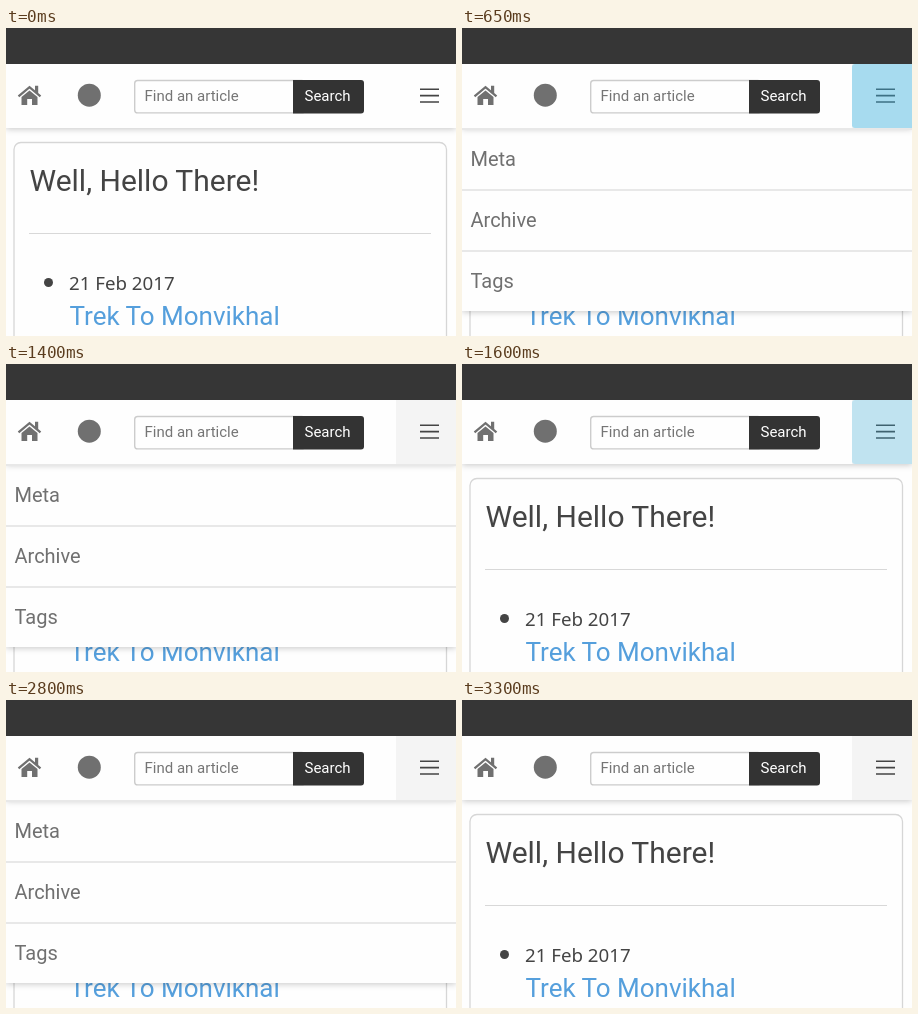
Write an HTML page that moves like this. It is 450 px wide and 308 px high and loops after 3350 ms.

```html
<!DOCTYPE html>
<html lang="en">
<head>
<meta charset="utf-8">
<title>Menu toggle</title>
<style>
html, body { margin: 0; width: 100%; height: 100%; overflow: hidden; background: #fefefe; }
svg { display: block; width: 450px; height: 308px; font-family: Roboto, sans-serif; }
.nav { filter: drop-shadow(0 1px 3px rgba(0, 0, 0, .22)); }
.icon, .item { fill: #707070; }
.item { font-size: 20px; }
.small { font-size: 15px; }
</style>
</head>
<body>
<svg viewBox="0 0 450 308">
  <rect width="450" height="308" fill="#fefefe"/>

  <g id="page" fill="#444">
    <rect x="8" y="114.5" width="432.5" height="220" rx="7" fill="#fefefe" stroke="#d6d6d6" stroke-width="1.3"/>
    <text x="23.5" y="163" font-size="30">Well, Hello There!</text>
    <path d="M23 205.5H425" stroke="#d8d8d8"/>
    <circle cx="42.5" cy="254.5" r="4.5"/>
    <text x="63" y="262" font-size="18.7" font-family="'Noto Sans', sans-serif">21 Feb 2017</text>
    <text x="63.5" y="297" font-size="26" fill="#559fdc">Trek To Monvikhal</text>
  </g>

  <g id="menu" class="nav">
    <rect y="100" width="450" height="183" fill="#fefefe"/>
    <text class="item" x="8.5" y="138">Meta</text>
    <text class="item" x="8.5" y="199">Archive</text>
    <text class="item" x="8.5" y="260">Tags</text>
    <path d="M0 162H450M0 223H450" stroke="#e8e8e8" stroke-width="2"/>
  </g>

  <rect class="nav" y="36" width="450" height="64" fill="#fefefe"/>
  <rect width="450" height="36" fill="#363636"/>
  <rect id="focus" x="390" y="36" width="60" height="64" fill="#f4f4f4"/>
  <path id="rule" d="M0 101H450" stroke="#e8e8e8" stroke-width="2"/>

  <path class="icon" d="M15.5 69L23.5 62.4L31.5 69V77H26V71H21.2V77H15.5ZM29 57.8H32.2V65H29Z"/>
  <path d="M12.5 68.3L23.5 59.2L34.5 68.3" fill="none" stroke="#707070" stroke-width="2.3"/>
  <circle class="icon" cx="83.3" cy="67.2" r="11.5"/>

  <rect x="128.7" y="52.5" width="170" height="32.4" rx="3" fill="#fefefe" stroke="#ccc" stroke-width="1.4"/>
  <path d="M287 52H355a3 3 0 0 1 3 3V82.500a3 3 0 0 1-3 3H287Z" fill="#333"/>
  <text class="small" x="138.500" y="73" fill="#757575">Find an article</text>
  <text class="small" x="298.500" y="73" fill="#fff">Search</text>

  <path d="M414 61.200H433M414 67.600H433M414 74H433" stroke="#444" stroke-width="1.600"/>
  <path id="tap" d="M450 36H393a3 3 0 0 0-3 3V97a3 3 0 0 0 3 3H450Z" fill="#33b5e5"/>
</svg>
<script>
const LOOP = 3350;
const taps = [
  { at: 650, hold: 100, fade: 300 },
  { at: 1500, hold: 0, fade: 300 },
  { at: 2300, hold: 0, fade: 150 },
  { at: 2900, hold: 0, fade: 300 }
];
const [menu, focus, rule, tap] =
  ['menu', 'focus', 'rule', 'tap'].map(id => document.getElementById(id));
const show = (el, on) => el.setAttribute('visibility', on ? 'visible' : 'hidden');

function draw(now) {
  const t = now % LOOP;
  const past = taps.filter(p => p.at <= t);
  const last = past[past.length - 1];
  const open = past.length % 2 === 1;
  show(menu, open);
  show(rule, open);
  show(focus, last);
  let glow = 0;
  if (last) {
    const left = 1 - (t - last.at - last.hold) / last.fade;
    glow = Math.max(0, Math.min(1, left));
  }
  tap.setAttribute('opacity', 0.4 * glow);
  requestAnimationFrame(draw);
}
draw(0);
</script>
</body>
</html>
```
